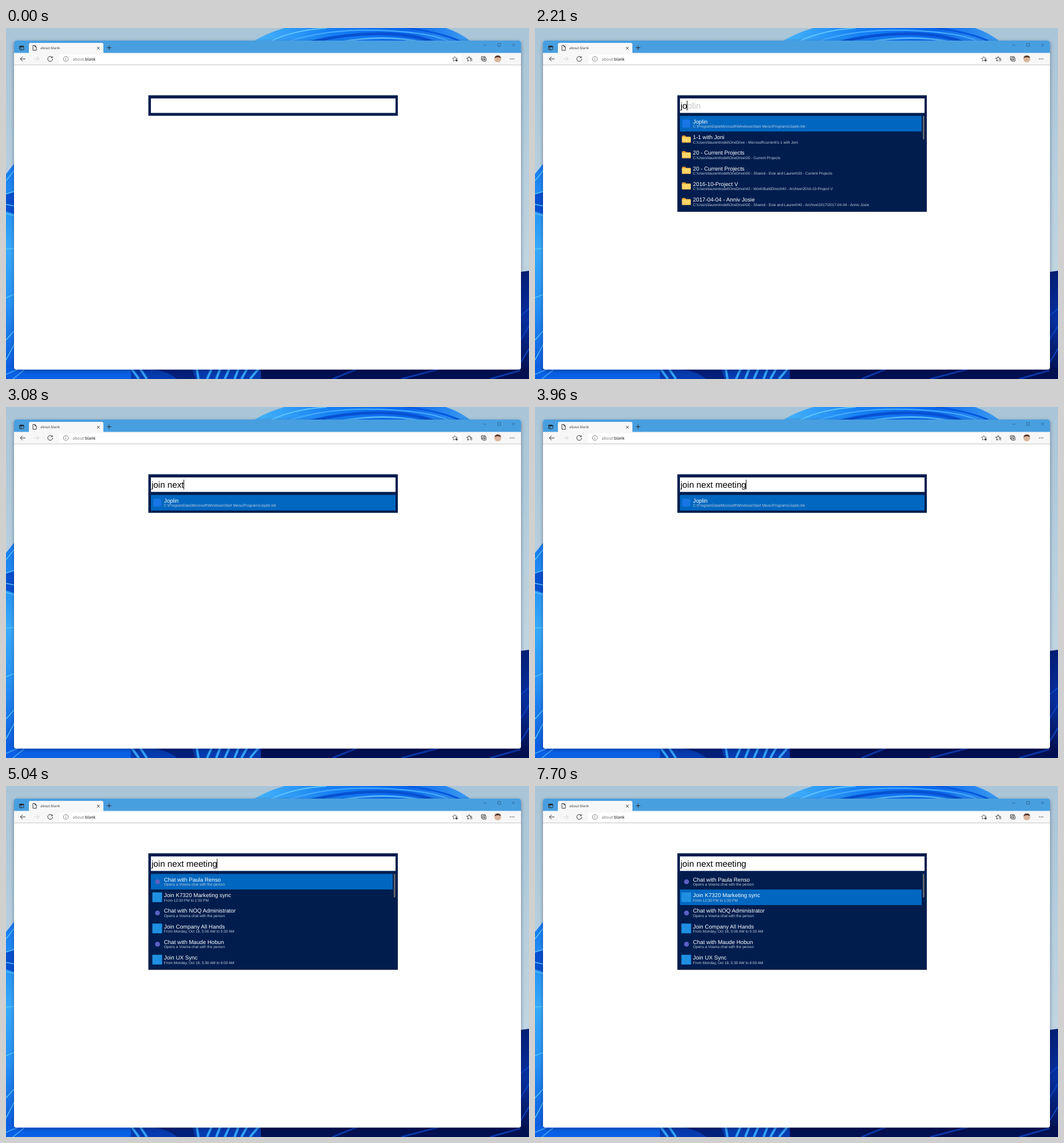
Recreate the animation shown at these times as an HTML page. Size 913 px wide and 613 px high, loop 8 s.

```html
<!DOCTYPE html>
<html lang="en">
<head>
<meta charset="utf-8">
<title>Launcher</title>
<style>
html, body { margin: 0; width: 100%; height: 100%; overflow: hidden; background: #b2cbdb; }
svg { display: block; }
text { font-family: Arial, "Liberation Sans", sans-serif; text-rendering: geometricPrecision; white-space: pre; }
.ui { font-family: "Noto Sans", "Open Sans", sans-serif; }
.title { font-size: 9.76px; fill: #fff; }
.sub { font-size: 6.5px; fill: #c5cede; }
.query { font-size: 15.2px; }
.line { fill: none; stroke: #222; stroke-width: .9; }
</style>
</head>
<body>
<svg width="913" height="613" viewBox="0 0 913 613">
  <defs>
    <linearGradient id="sky" x2="0" y2="1"><stop stop-color="#a9c5d7"/><stop offset=".7" stop-color="#c0d5e2"/></linearGradient>
    <linearGradient id="arc"><stop stop-color="#47b5fa"/><stop offset=".35" stop-color="#1680f3"/><stop offset=".7" stop-color="#0967ec"/><stop offset="1" stop-color="#3c9cf2"/></linearGradient>
    <linearGradient id="petal" x2="0" y2="1"><stop stop-color="#1679ef"/><stop offset=".4" stop-color="#37aaf9"/><stop offset=".65" stop-color="#2792f5"/><stop offset="1" stop-color="#0754dc"/></linearGradient>
    <linearGradient id="deep" x2="0" y2="1"><stop stop-color="#031d75"/><stop offset=".45" stop-color="#0630a0"/><stop offset="1" stop-color="#020c48"/></linearGradient>
    <filter id="shadow" x="-5%" y="-5%" width="110%" height="112%"><feDropShadow dx="0" dy="2" stdDeviation="3" flood-color="#001030" flood-opacity=".4"/></filter>
    <clipPath id="clip"><rect x="249" y="118" width="421" height="203"/></clipPath>
    <g id="folder">
      <path d="M256.5 8.5q0-1.5 1.5-1.5h4l2 2h6.500q1.500 0 1.500 1.500v3h-15.500z" fill="#e6a02f"/>
      <rect x="256.500" y="9.800" width="15.500" height="9.700" rx="1" fill="#ffd567"/>
      <path d="M257 18.500h14.500" stroke="#efb944"/>
    </g>
    <g id="image">
      <path d="M258.500 6h8.500l3 3v11.500h-11.500z" fill="#f6f8fa"/>
      <path d="M267 6v3h3" fill="#c3ccd6"/>
      <rect x="259.800" y="10" width="9" height="7.500" fill="#1681d4"/>
      <path d="M259.800 17.500l3.500-4 2.200 2 1.300-1 2 3z" fill="#0a3f7d"/>
    </g>
    <rect id="note" x="257" y="6.500" width="14" height="14" rx="2" fill="#1775e5"/>
    <rect id="event" x="255.500" y="5" width="17" height="17" fill="#1f8fe2"/>
    <circle id="chat" cx="264.500" cy="13.700" r="4.300" fill="#5b60c5"/>
  </defs>

  <rect width="913" height="613" fill="url(#sky)"/>
  <path d="M432 23Q455 9 486 0H768Q794 9 811 23z" fill="url(#arc)"/>
  <g fill="none">
    <path d="M462 23Q500 4 560 0" stroke="#62c5ff" stroke-width="2"/>
    <path d="M492 24Q560 1 650 4T775 24" stroke="#49adff" stroke-width="2"/>
    <path d="M530 25Q590 10 650 10T748 25" stroke="#0751d2" stroke-width="5"/>
    <path d="M580 25Q660 10 728 25" stroke="#53b4fb" stroke-width="3"/>
    <path d="M700 0Q760 8 792 23" stroke="#0758dd" stroke-width="3"/>
  </g>
  <path d="M0 255L15 236V613H0z" fill="url(#petal)"/>
  <path d="M0 290L15 287V325L0 320z" fill="#0750cf"/>
  <g fill="none" stroke="#58c4ff" stroke-width="1.500">
    <path d="M0 267L15 248M0 290L15 285M0 308L15 311M0 324L15 328M0 386L15 385M0 471L15 465M0 545L15 528M0 580L15 551"/>
  </g>
  <path d="M898 426L913 424V613H898z" fill="url(#deep)"/>
  <path d="M898 503L913 490M898 545L913 520M898 585L913 560" stroke="#0a45c4" stroke-width="2"/>
  <rect y="594" width="222" height="19" fill="#0960e5"/>
  <rect x="218" y="594" width="230" height="19" fill="#053baf"/>
  <rect x="445" y="594" width="468" height="19" fill="#020f50"/>
  <path d="M0 605Q10 600 20 597M12 613L32 597" stroke="#399cf8" stroke-width="2" fill="none"/>
  <g stroke="#33a3fb" stroke-width="4">
    <path d="M219 595L232 613M234 595L246 613M333 595L336 613M359 595L351 613M374 595L367 613M390 595L382 613M406 595L399 613M421 595L411 613M441 595L426 613"/>
  </g>
  <path d="M258 596Q285 601 299 613H331L325 596z" fill="#031f79"/>
  <path d="M570 613L612 596M690 613L755 596M845 613L898 598" stroke="#0a37a8" stroke-width="3"/>

  <rect x="14" y="22" width="885" height="574.500" rx="4" fill="#fff" filter="url(#shadow)"/>
  <path d="M14 44V26q0-4 4-4H895q4 0 4 4V44z" fill="#489fe0"/>
  <rect x="14" y="43.500" width="885" height="21" fill="#f7f7f7"/>
  <path d="M14 64.500H899" stroke="#c8c8c8"/>
  <path d="M40 44V29q0-3 3-3H167q3 0 3 3V44z" fill="#f7f7f7"/>
  <rect x="93" y="46" width="702" height="16.500" rx="2" fill="#fff"/>
  <g class="line">
    <rect x="23.500" y="31.500" width="7.500" height="6.500" rx="1"/><path d="M23.500 32.500H31" stroke-width="2"/><path d="M26 33V38"/>
    <path d="M47 30.500h3.500l2.500 2.500v6h-6zM50.500 30.500V33H53"/>
    <path d="M159 33l4.500 4.500M163.500 33l-4.500 4.500M176 34.500h8M180 30.500v8"/>
    <path d="M34 54H25M29 50l-4 4 4 4"/>
    <path d="M49 54h9M54 50l4 4-4 4" stroke="#cfcfcf"/>
    <path d="M80.500 51.200a4.300 4.300 0 1 0 1 2.800M81 49.500V52h-2.700"/>
    <g stroke="#777"><circle cx="104.500" cy="54" r="4.300"/><path d="M104.500 53.200v3M104.500 51.300v1"/></g>
    <path id="star" d="M783.500 49.800l1.300 2.700 3 .4-2.200 2 .5 3-2.600-1.400-2.600 1.400.5-3-2.200-2 3-.4z" stroke="#555"/>
    <circle cx="786.500" cy="56.500" r="2.200" fill="#444" stroke="#fff" stroke-width=".6"/>
    <path d="M808.500 49.800l1.300 2.700 3 .4M808.500 49.800l-1.300 2.700-3 .4 2.200 2-.5 3 2.600-1.400M810 54.500h4M810 57h4"/>
    <path d="M831.500 56h-1.500v-6h6.500v1.500"/><rect x="832" y="52" width="6" height="6" rx="1"/><path d="M833.300 55h3.400M835 53.300v3.400"/>
    <g stroke="#28618f" stroke-width=".8"><path d="M833 30h5.500M883.500 27l5 5M888.500 27l-5 5"/><rect x="858.500" y="27" width="5" height="5"/></g>
  </g>
  <circle cx="858.500" cy="54" r="6" fill="#d9b59b"/>
  <path d="M852.700 52.500a6 6 0 0 1 11.600 0q-5.800-3-11.600 0z" fill="#59352c"/>
  <g fill="#222"><circle cx="880.500" cy="54" r=".8"/><circle cx="883.500" cy="54" r=".8"/><circle cx="886.500" cy="54" r=".8"/></g>
  <text class="ui" x="60" y="37.200" font-size="6.100" fill="#444">about:blank</text>
  <text class="ui" x="116.500" y="56.600" font-size="7.100" fill="#777">about:<tspan fill="#111">blank</tspan></text>

  <rect id="panel" x="248.500" y="117.500" width="435.500" height="36" fill="#001d4e"/>
  <rect x="253" y="123" width="427" height="25.300" fill="#fff"/>
  <rect id="mark" x="253" y="153.500" width="422" height="27.250" fill="#0067c0"/>
  <rect id="bar" x="677" y="153.500" width="2.600" height="41" fill="#6d6d6d"/>
  <g id="lists" clip-path="url(#clip)"></g>
  <text class="query" x="254" y="141"><tspan id="typed"></tspan><tspan id="hint" fill="#c8c8c8"></tspan></text>
  <rect id="caret" y="127" width="1" height="17" fill="#111"/>
</svg>
<script>
const LOOP = 8000, TOP = 153.5, PITCH = 27.25;
const $ = id => document.getElementById(id);
const raw = String.raw;

const home = raw`C:\Users\laurentrodel\OneDrive`;
const shared = home + raw`\00 - Shared - Evie and Laurent`;
const joplin = ['note', 'Joplin', raw`C:\ProgramData\Microsoft\Windows\Start Menu\Programs\Joplin.lnk`];
const scan = end => ['image',
  `2011-01-07 - Ouverture compte joint Tavuro - Tavuro ouverture compte joint${end}.jpeg`,
  shared + raw`\41 - Documents archive\Banking\Boursorama\Lettre\2011-01-07 - Ouverture`];
const chat = who => ['chat', 'Chat with ' + who, 'Opens a Vosma chat with the person'];
const join = (what, when) => ['event', 'Join ' + what, 'From ' + when];

const lists = {
  jo: [
    joplin,
    ['folder', '1-1 with Joni', home + raw` - Microsoft\current\1-1 with Joni`],
    ['folder', '20 - Current Projects', home + raw`\20 - Current Projects`],
    ['folder', '20 - Current Projects', shared + raw`\20 - Current Projects`],
    ['folder', '2016-10-Project V', home + raw`\42 - Work\BuildDirect\40 - Archive\2016-10-Project V`],
    ['folder', '2017-04-04 - Anniv Josie', shared + raw`\40 - Archive\2017\2017-04-04 - Anniv Josie`]
  ],
  join: [
    joplin,
    ['folder', 'joint', shared + raw`\40 - Archive\2017\RP - Entree Express\Documents\Laurent\Funds\Boursorama`],
    scan(' 1'), scan(' 2'), scan(' 3'), scan('')
  ],
  single: [joplin],
  meeting: [
    chat('Paula Renso'),
    join('K7320 Marketing sync', '12:30 PM to 1:30 PM'),
    chat('NOQ Administrator'),
    join('Company All Hands', 'Monday, Oct 18, 5:00 AM to 5:30 AM'),
    chat('Maude Hobun'),
    join('UX Sync', 'Monday, Oct 18, 5:30 AM to 6:00 AM')
  ]
};

// time, typed text, list, completion hint
const steps = [
  [0, ''], [2000, 'j'], [2070, 'j', 'jo', 'oplin'], [2140, 'jo', 'jo', 'plin'],
  [2360, 'joi', 'jo'], [2430, 'joi', 'join'], [2600, 'join ', 'join'], [2800, 'join ne', 'join'],
  [3080, 'join next', 'single'], [3170, 'join next ', 'single']
];
[...'meeting'].forEach((c, i) =>
  steps.push([Math.round(3370 + i * 590 / 6), 'join next ' + 'meeting'.slice(0, i + 1), 'single']));
steps.push([4455, 'join next meeting', 'meeting']);

const flips = [530, 1140, 1600, 4380, 5040, 5500, 6090, 6620, 7170, 7700];
const iconTime = i => 4530 + 73 * i;

$('lists').innerHTML = Object.entries(lists).map(([name, rows]) =>
  `<g id="list-${name}">` + rows.map(([icon, title, sub], i) =>
    `<g transform="translate(0 ${TOP + i * PITCH})"><use href="#${icon}"/>
    <text class="title" x="275.800" y="13.400">${title}</text>
    <text class="sub" x="275.800" y="20.900">${sub}</text></g>`).join('') + '</g>').join('');
const icons = [...document.querySelectorAll('#list-meeting use')];

const show = (el, on) => { el.style.display = on ? '' : 'none'; };

function render(t) {
  const [, text, list, hint = ''] = steps.findLast(s => s[0] <= t);
  const count = list ? lists[list].length : 0;
  const full = count > 1;

  $('typed').textContent = text;
  $('hint').textContent = hint;
  $('caret').setAttribute('x', Math.round(254 + (text ? $('typed').getComputedTextLength() - .4 : 0)));
  show($('caret'), flips.filter(f => f <= t).length % 2);

  $('panel').setAttribute('height', full ? 203.5 : count ? 67.3 : 35.8);
  $('mark').setAttribute('width', full ? 422 : 427);
  $('mark').setAttribute('y', TOP + (t >= 7100 ? PITCH : 0));
  show($('mark'), count);
  show($('bar'), full);
  for (const name in lists) show($('list-' + name), name === list);
  icons.forEach((icon, i) => show(icon, t >= iconTime(i)));
}

const start = performance.now();
function tick() {
  render((performance.now() - start) % LOOP);
  requestAnimationFrame(tick);
}
tick();
</script>
</body>
</html>
```
